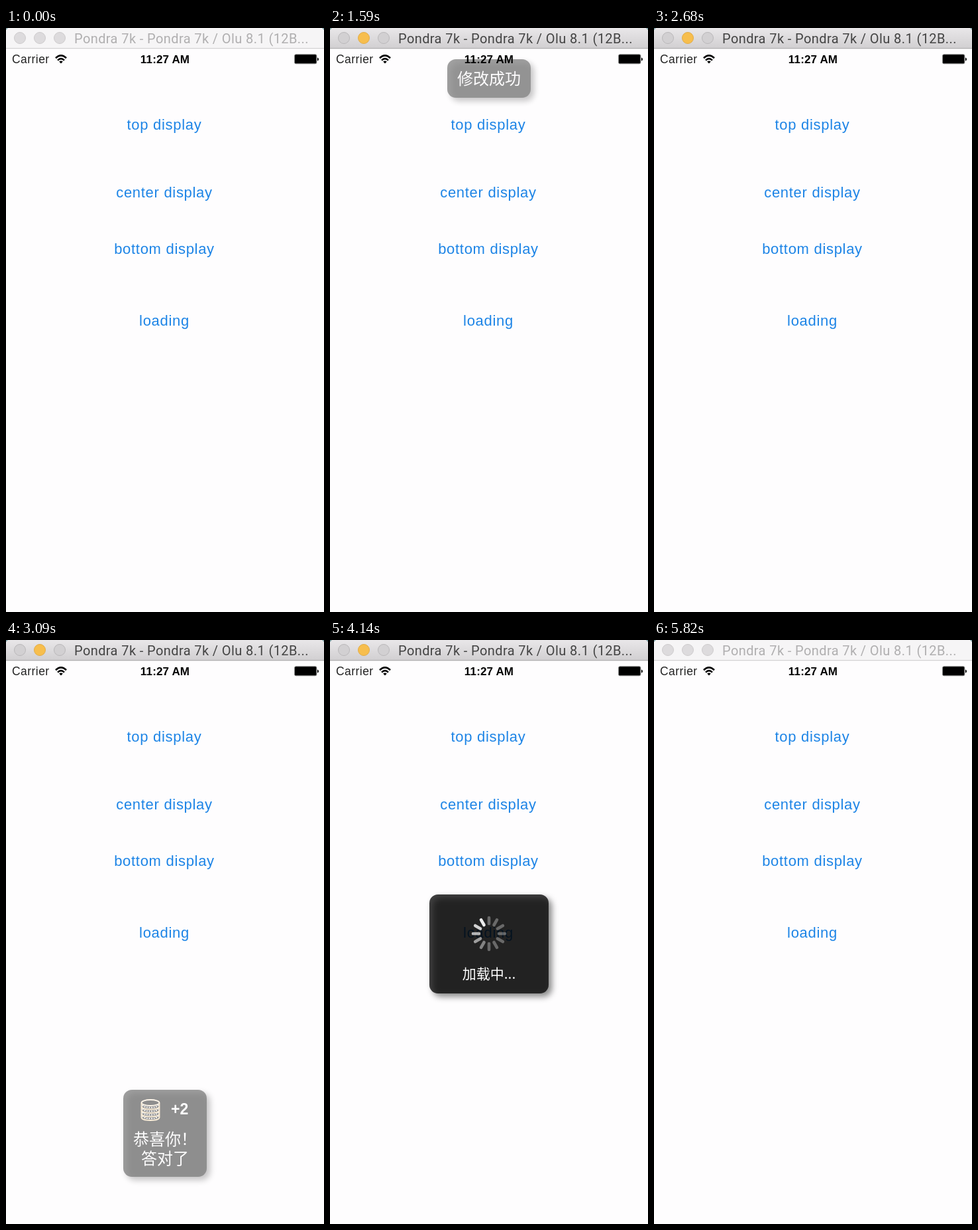
These frames come from a looping animation (480 px wide and 879 px high, 5870 ms). An HTML page:

```html
<!DOCTYPE html>
<html lang="en">
<head>
<meta charset="utf-8">
<title>Toast demo</title>
<style>
  html, body { margin: 0; width: 100%; height: 100%; overflow: hidden; background: #fefdfe; }
  svg { display: block; width: 480px; height: 879px; }
  text { font-family: "Liberation Sans", Arial, sans-serif; }
  .link { font-size: 22px; letter-spacing: .7px; fill: #1c84e6; text-anchor: middle; }
  .title { font: 20px Roboto, sans-serif; letter-spacing: .4px; }
  .cjk { font-family: "Noto Sans CJK SC", "Noto Sans CJK", sans-serif; font-weight: 300; font-size: 24px; fill: #fff; text-anchor: middle; }
</style>
</head>
<body>
<svg viewBox="0 0 480 879">
  <defs>
    <linearGradient id="bar" x2="0" y2="1">
      <stop stop-color="#e9e7e9"/>
      <stop offset="1" stop-color="#d1cfd1"/>
    </linearGradient>
    <filter id="blur" x="-30%" y="-40%" width="160%" height="180%">
      <feGaussianBlur stdDeviation="5"/>
    </filter>
  </defs>
  <rect width="480" height="879" fill="#fefdfe"/>
  <g id="links"></g>
  <g id="toasts"></g>

  <g id="status">
    <text x="9" y="53" font-size="17.5" letter-spacing=".45" fill="#222">Carrier</text>
    <text x="240" y="53" font-size="17" letter-spacing=".15" font-weight="bold" text-anchor="middle">11:27 AM</text>
    <g fill="none" stroke="#000" stroke-width="2.6">
      <path d="M75 45.2Q83 37.5 91 45.2M78 48.6Q83 43.8 88 48.6"/>
      <path d="M80.2 50.6Q83 48.4 85.8 50.6L83 53.6Z" fill="#000" stroke="none"/>
    </g>
    <rect x="435.5" y="39.8" width="33.4" height="14" rx="2" fill="#000" stroke="#8c8c8c"/>
    <path d="M470 44.5q2 .5 2 2.5t-2 2.5z"/>
  </g>

  <rect id="titleBar" width="480" height="30.5"/>
  <rect id="titleLine" y="30" width="480" height="1.3"/>
  <path d="M0 0h3L0 3zM480 0h-3l3 3z" fill="#7fa3a8"/>
  <g id="lights"></g>
  <text id="title" class="title" x="103" y="22.5">Pondra 7k - Pondra 7k / Olu 8.1 (12B...</text>
</svg>
<script>
const LOOP = 5870, FADE = 150;
const $ = id => document.getElementById(id);

function add(parent, tag, attrs = {}, text = '') {
  const el = document.createElementNS('http://www.w3.org/2000/svg', tag);
  for (const key in attrs) el.setAttribute(key, attrs[key]);
  el.textContent = text;
  return parent.appendChild(el);
}

[['top display', 152.5], ['center display', 254.5], ['bottom display', 340], ['loading', 448]]
  .forEach(([label, y]) => add($('links'), 'text', { class: 'link', x: 239, y }, label));

const lights = [21, 51, 81].map(cx => add($('lights'), 'circle', { cx, cy: 15, r: 8.5 }));

// A toast is a translucent panel over its own offset shadow.
function toast(y, width, height, start, end) {
  const g = add($('toasts'), 'g', { transform: `translate(240 ${y})` });
  const box = { x: -width / 2, width, height, rx: 13 };
  add(g, 'rect', { ...box, transform: 'translate(5 5)', 'fill-opacity': .46, filter: 'url(#blur)' });
  add(g, 'rect', { ...box, 'fill-opacity': .75 });
  return { g, start, end };
}

const label = (g, y, text, attrs) => add(g, 'text', { class: 'cjk', x: 0, y, ...attrs }, text);

function rewardToast(y, start, end) {
  const item = toast(y, 126, 131, start, end), { g } = item;
  const coins = add(g, 'g', { fill: 'none', stroke: '#f7dfb4', 'stroke-width': 1.8 });
  add(coins, 'ellipse', { cx: -22, cy: 19.5, rx: 13.5, ry: 4.5, stroke: '#fff0d8' });
  for (let i = 0; i < 4; i++) {
    const top = 20 + i * 5.5;
    add(coins, 'path', { d: `M-35.5 ${top}v5c0 6 27 6 27 0v-5` });
    add(coins, 'path', { d: `M-34 ${top + 3}c2 5 22 5 24 0`, stroke: '#fff', 'stroke-dasharray': '2 1.5' });
  }
  add(g, 'text', { x: 9, y: 37, 'font-size': 23, 'font-weight': 'bold', fill: '#fff' }, '+2');
  label(g, 83, '恭喜你！');
  label(g, 112, '答对了');
  return item;
}

const topToast = toast(47, 126, 58, 1130, 1664);
label(topToast.g, 38, '修改成功');

const loader = toast(383, 180, 149, 3890, 5215);
label(loader.g, 127, '加载中...', { style: 'font-size:21px' });
const spokes = Array.from({ length: 12 }, (_, i) => add(loader.g, 'line', {
  y1: -15, y2: -24, stroke: '#fff', 'stroke-width': 4.6, 'stroke-linecap': 'round',
  transform: `translate(0 59) rotate(${i * 30})`
}));

const toasts = [topToast, rewardToast(389, 2060, 2600), rewardToast(677, 3015, 3548), loader];

function render(t) {
  const active = t >= 580 && t < 5270;
  $('titleBar').setAttribute('fill', active ? 'url(#bar)' : '#f6f5f6');
  $('titleLine').setAttribute('fill', active ? '#b0aeb0' : '#d4d3d4');
  $('title').setAttribute('fill', active ? '#444' : '#b0afb0');
  lights.forEach((light, i) => {
    const lit = active && i === 1;
    light.setAttribute('fill', lit ? '#f7be4d' : active ? '#d2d0d2' : '#dddbdd');
    light.setAttribute('stroke', lit ? '#e2ac48' : active ? '#bab8ba' : '#cecccd');
  });

  for (const { g, start, end } of toasts) {
    const alpha = Math.max(0, Math.min(1, (t - start) / FADE, (end - t) / FADE));
    g.setAttribute('opacity', alpha);
    g.setAttribute('display', alpha ? 'inline' : 'none');
  }

  const lead = Math.floor((t - 4120) / 43.2) + 11;
  spokes.forEach((spoke, i) => {
    const age = (((lead - i) % 12) + 12) % 12;
    spoke.setAttribute('stroke-opacity', Math.max(.32, .92 - age * .12));
  });
}

const begin = performance.now();
function tick() {
  render((performance.now() - begin) % LOOP);
  requestAnimationFrame(tick);
}
tick();
</script>
</body>
</html>
```
